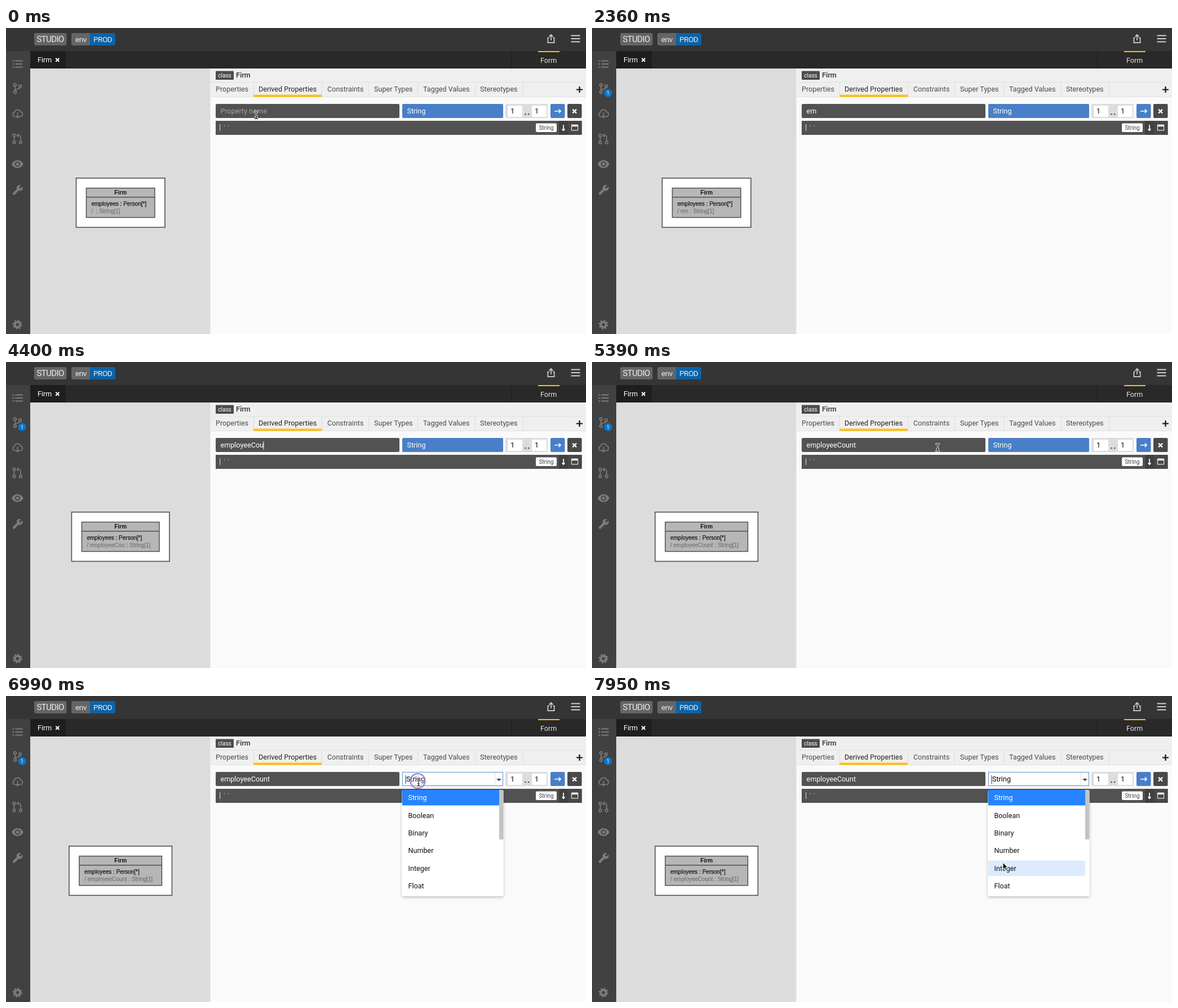
Write an HTML page that moves like this. It is 1029 px wide and 544 px high and loops after 8 s.

```html
<!DOCTYPE html>
<html lang="en">
<head>
<meta charset="utf-8">
<title>Derived property editor</title>
<style>
html, body { margin: 0; width: 100%; height: 100%; overflow: hidden; background: #fafafa; }
svg { display: block; width: 1029px; height: 544px; }
text { font: 12.6px Roboto, sans-serif; white-space: pre; }
.mid { text-anchor: middle; }
.white { fill: #fff; }
.dark { fill: #525252; }
.tag { font-size: 15px; letter-spacing: -.6px; fill: #ececec; }
.env { font-size: 13.6px; letter-spacing: -.5px; }
.small { font-size: 10px; }
.uml text { font: 10px "Liberation Sans", Arial, sans-serif; stroke-width: .25px; }
.line { fill: none; stroke: #7c7c7c; stroke-width: 1.7; }
.icon { fill: #7c7c7c; }
.stroke { fill: none; stroke: #fff; stroke-width: 2; }
.cursor { fill: #000; stroke: #fff; stroke-width: 1; stroke-linejoin: round; }
</style>
</head>
<body>
<svg viewBox="0 0 1029 544">
  <defs>
    <filter id="shadow" x="-10%" y="-10%" width="120%" height="120%">
      <feDropShadow dx="0" dy="2" stdDeviation="2.5" flood-opacity=".25"/>
    </filter>
  </defs>

  <!-- frame -->
  <rect width="1029" height="544" fill="#fafafa"/>
  <rect width="1029" height="41" fill="#353535"/>
  <rect y="41" width="43" height="503" fill="#414141"/>
  <rect x="43" y="41" width="986" height="31" fill="#292929"/>
  <rect x="43" y="41" width="63" height="31" fill="#1e1e1e"/>
  <rect x="896" y="41" width="1" height="31" fill="#1c1c1c"/>
  <rect x="944" y="41" width="38" height="2" fill="#ffc014"/>
  <rect x="43" y="72" width="319" height="472" fill="#dcdcdc"/>
  <rect x="362" y="72" width="1" height="472" fill="#ededed"/>

  <!-- top bar -->
  <rect x="50" y="9" width="57.5" height="22" rx="3" fill="#656565"/>
  <text class="tag" x="54.5" y="25.3">STUDIO</text>
  <path d="M119 9h30v22h-30a3 3 0 0 1-3-3v-16a3 3 0 0 1 3-3z" fill="#656565"/>
  <path d="M149 9h42a3 3 0 0 1 3 3v16a3 3 0 0 1-3 3h-42z" fill="#0c62a6"/>
  <text class="tag env" x="123" y="24.7">env</text>
  <text class="tag env white" x="155" y="24.7">PROD</text>
  <path class="line" style="stroke:#d2d2d2" d="M964 17.5h-2.6v8.6h11.2v-8.6h-2.6M967 22v-9.5M963.6 15.4l3.4-3.4 3.4 3.4"/>
  <path class="stroke" style="stroke:#d2d2d2" d="M1002.5 13.5h16M1002.5 19h16M1002.5 24.5h16"/>
  <text class="white" x="56" y="61">Firm</text>
  <path class="stroke" d="M88.3 53.8l6 6m0-6l-6 6"/>
  <text x="948" y="61.5" fill="#e4e4e4">Form</text>

  <!-- side bar -->
  <path class="line" style="stroke-width:2" d="M11.5 58.5h3M16.5 58.5h13M11.5 64h3M16.5 64h13M11.5 69.5h3M16.5 69.5h13"/>
  <g class="line">
    <circle cx="16" cy="101.2" r="2.3"/><circle cx="16" cy="114" r="2.3"/><circle cx="25" cy="103.5" r="2.3"/>
    <path d="M16 103.5v8.2M25 105.8c0 4-9 1.6-9 5.5"/>
    <path d="M17 157.5h-1.500a4 4 0 0 1-.4-7.800a5.600 5.600 0 0 1 10.700-.6a4.300 4.300 0 0 1 .2 8.400h-2M20.500 150.500v8.800M17.500 156.600l3 3 3-3"/>
    <circle cx="14.500" cy="191" r="2.3"/><circle cx="14.500" cy="203.500" r="2.3"/><circle cx="26" cy="203.500" r="2.3"/>
    <path d="M14.500 193.300v8M26 201.200v-7.200q0-3-3-3h-3M22.500 188l-3 3 3 3"/>
  </g>
  <path class="icon" fill-rule="evenodd" transform="translate(9.300 230.900) scale(.93)" d="M12 4.500C7 4.500 2.730 7.610 1 12c1.730 4.390 6 7.500 11 7.500s9.270-3.110 11-7.500c-1.730-4.390-6-7.500-11-7.500zM12 17a5 5 0 1 1 0-10a5 5 0 1 1 0 10zM12 9a3 3 0 1 0 0 6a3 3 0 1 0 0-6z"/>
  <path class="icon" transform="translate(30.500 278) scale(-.83 .83)" d="M22.700 19l-9.100-9.100c.9-2.300.4-5-1.500-6.900-2-2-5-2.400-7.400-1.300L9 6 6 9 1.600 4.700C.4 7.100.9 10.100 2.900 12.100c1.900 1.900 4.600 2.400 6.900 1.500l9.100 9.100c.4.4 1 .4 1.400 0l2.300-2.300c.5-.4.5-1.100.1-1.400z"/>
  <g class="line" transform="translate(20.300 527.300)">
    <circle r="4.500" stroke-width="3.600" style="stroke-width:3.600px"/>
    <circle r="6.900" style="stroke-width:3px" stroke-dasharray="3.100 2.319"/>
  </g>
  <g id="badge">
    <circle cx="28.500" cy="115.800" r="7" fill="#0a78cf"/>
    <text class="mid white" x="28.500" y="119" style="font-size:9px">1</text>
  </g>

  <!-- diagram -->
  <g class="uml" stroke="#505050">
    <rect id="outer" y="266.800" height="87.600" fill="#fff" stroke-width="1.600"/>
    <rect id="inner" y="284.600" height="52.200" fill="#b6b6b6" stroke-width="1.500"/>
    <path id="rule" stroke-width="1.400"/>
    <text class="mid" x="203.200" y="296.200" style="font-weight:bold" fill="#111" stroke="none">Firm</text>
    <text id="prop" y="316.300" fill="#161616" stroke="#161616">employees : Person[*]</text>
    <text id="derived" y="328.500" fill="#777" stroke="#777"></text>
  </g>

  <!-- form -->
  <rect x="363" y="72" width="666" height="51" fill="#efefef"/>
  <path d="M363 96.500h666M363 122.500h666" stroke="#e2e2e2"/>
  <rect x="372" y="76.500" width="32" height="15.500" rx="1" fill="#4c4c4c"/>
  <text class="small white" x="376.300" y="88">class</text>
  <text x="408" y="88" style="font-weight:bold" fill="#4a4a4a">Firm</text>
  <g id="tabs"></g>
  <rect x="439" y="118.600" width="121" height="4" fill="#ffbf0f"/>
  <path class="stroke" style="stroke:#111;stroke-width:2.200" d="M1012 109.500h11M1017.500 104v11"/>

  <rect class="dark" x="372" y="135" width="326" height="25" rx="2"/>
  <text id="name" x="380.500" y="152.300"></text>
  <rect id="caret" y="141" width="1" height="15" fill="#fff"/>

  <g id="button">
    <rect id="buttonBox" x="703" y="135" width="179" height="25" rx="2"/>
    <text id="buttonText" class="white" y="152"></text>
  </g>

  <rect x="886" y="135" width="75" height="25" rx="2" fill="#dcdcdc"/>
  <rect class="white" x="890" y="138" width="26" height="20"/>
  <rect class="white" x="933" y="138" width="26" height="20"/>
  <text x="895" y="152.300">1</text>
  <text x="938" y="152.300">1</text>
  <path d="M920.500 152h2.200v2.200h-2.200zM926 152h2.200v2.200h-2.200z" fill="#444"/>
  <rect x="966" y="135" width="25.500" height="25" rx="2" fill="#497fc8"/>
  <path class="stroke" style="stroke-width:1.600" d="M973 147.800h11M980.700 144.500l3.400 3.300-3.400 3.300"/>
  <rect x="996" y="135" width="25.500" height="25" rx="2" fill="#494949"/>
  <path class="stroke" style="stroke-width:2.200" d="M1005.200 144.600l6.800 6.800m0-6.800l-6.800 6.800"/>

  <!-- expression -->
  <rect class="dark" x="372" y="165" width="649.500" height="25"/>
  <rect x="981" y="165" width="16" height="25" fill="#404040"/>
  <rect x="997" y="165" width="24.500" height="25" fill="#474747"/>
  <rect x="379" y="171" width="1.200" height="12" fill="#ccc"/>
  <text x="384" y="180" style="font:11.700px 'Liberation Mono',monospace" fill="#d08068">''</text>
  <rect class="white" x="940" y="169.500" width="37" height="15.500" rx="2"/>
  <text class="small mid" x="958.500" y="181" fill="#444">String</text>
  <path class="stroke" style="stroke-width:1.700" d="M989 172v9.500M986.500 179.500l2.500 2.800 2.500-2.800"/>
  <path fill="#e6e6e6" fill-rule="evenodd" d="M1003.500 171.500h11q.7 0 .7.700v9.600q0 .7-.7.700h-11q-.7 0-.7-.7v-9.600q0-.7.700-.7zM1004 175.200v6h10v-6z"/>

  <!-- type selector -->
  <g id="select">
    <rect class="white" x="703.500" y="135.500" width="178" height="24" stroke="#5a90d2"/>
    <rect x="867" y="136" width="1" height="23" fill="#d5dde8"/>
    <path d="M870.300 147h8.400l-4.200 4.600z" fill="#444"/>
    <text x="710" y="152.300">String</text>
    <rect id="selectCaret" x="708.500" y="141" width="1" height="15" fill="#222"/>
  </g>
  <g id="menu">
    <rect class="white" x="702.500" y="167" width="180" height="189" rx="3.500" filter="url(#shadow)"/>
    <g id="options"></g>
    <rect x="875" y="167.500" width="7.500" height="87.500" fill="#c3c3c3"/>
  </g>

  <!-- pointer -->
  <g id="ring" fill="none">
    <circle id="ringOut" stroke="#8b80d3" stroke-width="2.200" fill="#9a90dc" fill-opacity=".1"/>
    <circle id="ringIn" stroke="#e6e2ff" stroke-width="1" stroke-opacity=".75"/>
  </g>
  <g id="beam" fill="none" stroke-linecap="round">
    <path id="beamEdge" stroke="#fff" stroke-width="2.600" stroke-opacity=".8" d="M-2.700-6.500Q0-6.500 0-4.500Q0-6.500 2.700-6.500M0-4.500V4.500M-2.700 6.500Q0 6.500 0 4.500Q0 6.500 2.700 6.500M-1.500 2.500h3"/>
    <use href="#beamEdge"/>
    <path stroke="#111" stroke-width="1.100" d="M-2.700-6.500Q0-6.500 0-4.500Q0-6.500 2.700-6.500M0-4.500V4.500M-2.700 6.500Q0 6.500 0 4.500Q0 6.500 2.700 6.500M-1.500 2.500h3"/>
  </g>
  <path id="hand" class="cursor" d="M-1.300 1Q-1.300-.4 0-.4T1.300 1V5Q2.600 4.200 3.500 5.400Q4.800 4.800 5.500 6Q7.300 5.600 7.300 7.400V9.500Q7.300 11 6 12.800H-.2Q-1.600 10.800-3.700 8.600Q-4.600 7.200-3.400 6.800Q-2.500 6.500-1.300 7.900Z"/>
  <path id="arrow" class="cursor" d="M0 0V11.500L2.700 9.100 4.400 13.200 6.500 12.300 4.800 8.300H8.300Z"/>
</svg>
<script>
const LOOP = 8000, BLINK = 495, STEP = 80;
const el = id => document.getElementById(id);
const set = (id, attrs) => { for (const k in attrs) el(id).setAttribute(k, attrs[k]); };
const show = (id, on) => { el(id).style.display = on ? "" : "none"; };
const at = (id, x, y) => set(id, { transform: `translate(${x} ${y})` });
const progress = (t, a, b) => Math.min(1, Math.max(0, (t - a) / (b - a)));
const easeOut = p => 1 - (1 - p) ** 3;
const easeInOut = p => p < .5 ? 4 * p ** 3 : 1 - 4 * (1 - p) ** 3;
const blinkOn = age => Math.floor(age / BLINK) % 2 === 0;

const FULL_NAME = "employeeCount";
const KEYS = [1290, 1450, 2770, 2930, 3090, 3250, 3500, 3580, 3990, 4150, 4400, 4480, 4560];
const FOCUS = 410, PRESS = 5950, EDIT = 6270, OPEN = 6910;
const CLICKS = [
  { down: 330, up: 650, x: 442.5, y: 152.5, r: 13.5 },
  { down: PRESS, up: 6190, x: 714, y: 149.3, r: 23.2 },
  { down: OPEN, up: 7150, x: 730.5, y: 151, r: 13.5 }
];
// start, end, from x, y, to x, y, easing
const MOVES = [
  [5230, 5870, 474, 155, 715, 150, easeOut],
  [5870, 6030, 715, 150, 718.5, 152.5, easeOut],
  [6350, 6750, 718.5, 152.5, 732, 153.5, easeInOut],
  [7150, 7950, 732, 153.5, 729, 296.3, easeInOut]
];
const ROW = 31.4, TOP = 167;

el("tabs").innerHTML = [
  ["Properties", 372, 439], ["Derived Properties", 448, 560], ["Constraints", 570, 643],
  ["Super Types", 653, 730], ["Tagged Values", 740, 832], ["Stereotypes", 841, 917]
].map(([label, x, edge], i) =>
  `<text x="${x}" y="113" fill="${i === 1 ? "#222" : "#4a4a4a"}">${label}</text>
   <rect x="${edge}" y="97" width="1" height="25" fill="#dedede"/>`).join("");

el("options").innerHTML = ["String", "Boolean", "Binary", "Number", "Integer", "Float"].map((label, i) =>
  `<rect id="row${i}" x="703" y="${TOP + ROW * i}" width="172" height="27.5"/>
   <text x="713.500" y="${185.3 + 31.3 * i}" fill="${i ? "#111" : "#fff"}">${label}</text>`).join("");

function pointerAt(t) {
  let pos = { x: 444, y: 155 };
  for (const [a, b, x0, y0, x1, y1, ease] of MOVES) {
    if (t < a) break;
    const p = ease(progress(t, a, b));
    pos = { x: x0 + (x1 - x0) * p, y: y0 + (y1 - y0) * p };
  }
  return pos;
}

function drawName(t) {
  const count = KEYS.filter(k => k <= t).length;
  const name = FULL_NAME.slice(0, count);
  el("name").textContent = name || "Property name";
  set("name", { fill: name ? "#fff" : "#a3a3a3" });
  const since = count ? KEYS[count - 1] : FOCUS;
  const end = name ? el("name").getComputedTextLength() : 0;
  set("caret", { x: 380 + end });
  show("caret", t >= FOCUS && t < PRESS && blinkOn(t - since));

  el("derived").textContent = `/ ${name} : String[1]`;
  const widest = Math.max(el("prop").getComputedTextLength(), el("derived").getComputedTextLength());
  const w = widest * 1.07 + 16.8, left = 203.2 - w / 2;
  set("inner", { x: left, width: w });
  set("outer", { x: left - 18, width: w + 36 });
  set("rule", { d: `M${left} 300.700h${w}` });
  set("prop", { x: left + 9 });
  set("derived", { x: left + 9 });
}

function drawRing(t) {
  const c = CLICKS.find(c => t >= c.down && t < c.up + 400);
  show("ring", c);
  if (!c) return;
  const r = c.r * easeOut(progress(t, c.down - STEP, c.down + 2 * STEP));
  at("ring", c.x, c.y);
  set("ring", { opacity: 1 - progress(t, c.up - STEP, c.up + 400) });
  set("ringOut", { r });
  set("ringIn", { r: Math.max(0, r - 1.6) });
}

function drawPointer(t, { x, y }) {
  const visible = t < KEYS[0] || t >= 5310;
  const hand = x > 703 && t < EDIT, arrow = y > 161;
  const kind = hand ? "hand" : arrow ? "arrow" : "beam";
  for (const id of ["hand", "arrow", "beam"]) show(id, visible && id === kind);
  at(kind, x, y);
}

function drawType(t, { x, y }) {
  const hover = x > 703, open = t >= OPEN;
  show("button", t < EDIT);
  set("buttonBox", { fill: hover ? "#3c66a4" : "#497fc8" });
  set("buttonText", { x: hover ? 759.6 : 711.5 });
  el("buttonText").textContent = hover ? "Click to edit" : "String";
  show("select", t >= EDIT);
  show("selectCaret", open && blinkOn(t - OPEN));
  show("menu", open);
  const over = Math.floor((y - TOP) / ROW);
  for (let i = 0; i < 6; i++)
    set("row" + i, { fill: i === 0 ? "#2684ff" : i === over ? "#deebff" : "#fff" });
}

function draw(t) {
  const q = t < 330 ? t : t < 5310 ? 330 + Math.floor((t - 330) / STEP) * STEP
    : 5310 + Math.floor((t - 5310) / STEP) * STEP;
  const pos = pointerAt(q);
  show("badge", t >= 2360);
  drawName(t);
  drawType(q, pos);
  drawRing(q);
  drawPointer(q, pos);
}

const start = performance.now();
function tick() {
  draw((performance.now() - start) % LOOP);
  requestAnimationFrame(tick);
}
tick();
</script>
</body>
</html>
```
